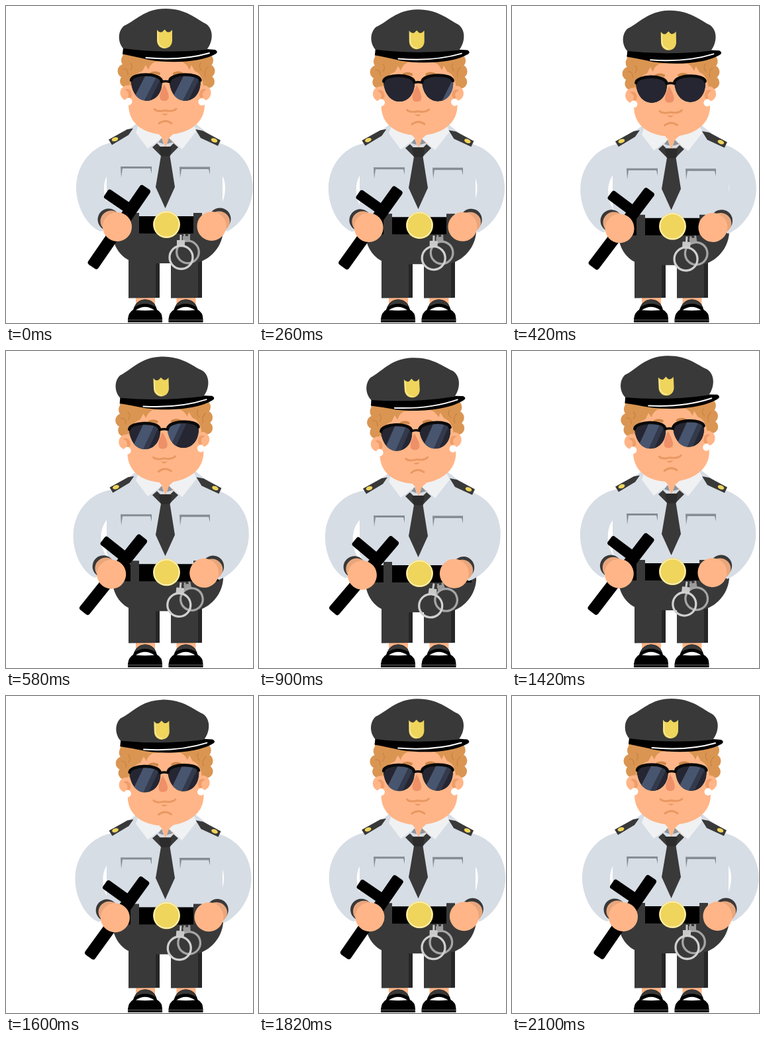
Animation, 373 px wide and 478 px high, one loop 2.12 s. Source, as an HTML page:

```html
<!DOCTYPE html>
<html lang="en">
<head>
<meta charset="utf-8">
<title>Officer</title>
<style>
html, body { margin: 0; width: 100%; height: 100%; overflow: hidden; background: #fff; }
svg { display: block; width: 373px; height: 478px; }
.dark { fill: #393939; }
.shirt { fill: #d7dde5; }
.skin { fill: #ffb587; }
.tan { fill: #e9a67c; }
.hair { fill: #da9552; }
.gold { fill: #efd55b; }
.line { fill: none; stroke-linecap: round; }
</style>
</head>
<body>
<svg viewBox="0 0 373 478">
  <defs>
    <path id="lens" d="M188.500 111C190 101 234 101 236 112C237 131 226 143 212.500 143C198 143 188.500 129 188.500 111Z"/>
    <clipPath id="lensClip"><use href="#lens"/></clipPath>
    <g id="shoe">
      <path class="skin" d="M196 439h29v14h-29z"/>
      <path d="M184 477V472Q185 462 192 458Q197 442.500 210 442.500Q224 442.500 228 458Q236 462 236 472V477Z"/>
      <path class="dark" d="M194 454Q199 442.500 210 442.500Q222 442.500 226 454Q210 444 194 454Z"/>
      <path fill="#fff" d="M196 458.500Q210 449 224 458.500Q210 460 196 458.500Z"/>
      <path fill="#666" d="M184 473h52v1h-52z"/>
    </g>
    <g id="leg">
      <path class="dark" d="M185 345h47v95l-47 .5z"/>
      <path fill="#262626" d="M226 345h6v94l-6 1z"/>
    </g>
    <g id="shine">
      <path fill="#48556f" d="M214 98H232L208 145H190Z"/>
      <path fill="#333a4c" d="M232 98H240L216 145H208Z"/>
    </g>
  </defs>

  <use href="#shoe"/><use href="#shoe" x="61.5"/>
  <use href="#leg"/><use href="#leg" x="64"/>

  <g id="body">
    <path class="dark" d="M159 314H328V340C326 366 304 388 279 388H207C183 388 164 373 160 343Z"/>
    <path class="shirt" d="M199 176L172 196L152 212V300L160 318H327V212L306 193L286 177Z"/>
    <path d="M168 317h153v26h-153z"/>
    <path class="dark" d="M188 312h13v32h-13zM283 312h13v32h-13z"/>
    <circle class="gold" cx="242.500" cy="329.500" r="20.500"/>
    <circle class="line" cx="242.500" cy="329.500" r="19" stroke="#fdf6cf" stroke-width="1.400"/>

    <path fill="#868c93" d="M173 242H220V253L218 245H176L174 259ZM262 242.500H308V254L306 246H265L263 259Z"/>
    <path class="skin" d="M220 180H265V200L241 215Z"/>
    <path fill="#f0f1f3" d="M201 177L196 191L214 215L236 199L228 190ZM283 178L288 188L266 216L246 199L256 190Z"/>
    <path class="shirt" d="M227 208L235 199L241 213ZM246 199L255 208L241 213Z"/>
    <path fill="#8d949b" d="M230 205.500L235 199L238 208ZM246 199L252 205.500L243 208Z"/>
    <path class="dark" d="M221 213L228 207L233 212H248L253 207L260 213L251 222L247.500 226L255 273L240.500 305L226 273L234 226L230 222Z"/>
    <path fill="#2c2c2c" d="M231 214L233 212H248L250 214L247.500 226.500H234Z"/>

    <g id="leftArm">
      <path class="shirt" d="M165 205C130 209 106 239 106 274C106 302 122 332 143 340L180 326C159 314 148 295 148 275C148 265 151 257 156 250L175 216Z"/>
      <ellipse class="dark" cx="155" cy="322" rx="16.500" ry="16.500"/>
      <ellipse class="tan" cx="159" cy="324.500" rx="16.500" ry="16"/>
      <rect x="98.500" y="324" width="145" height="18.500" rx="4" transform="rotate(-55.5 171 333.500)"/>
      <rect x="151" y="275.500" width="46" height="16" rx="3.500" transform="rotate(34 153.500 283)"/>
      <circle class="skin" cx="168" cy="333" r="22"/>
    </g>
    <g id="rightArm">
      <path class="shirt" d="M313 205C349 210 372.500 239 372.500 274C372.500 304 354 330 334 340L299 326C320 315 331 295 331 274C331 263 328 256 322 250L303 216Z"/>
      <ellipse class="dark" cx="323" cy="321" rx="16.500" ry="16.500"/>
      <ellipse class="tan" cx="321.500" cy="325" rx="16.500" ry="15.500"/>
      <circle class="skin" cx="310.500" cy="332" r="22"/>
    </g>

    <g id="marks">
      <path class="dark" d="M155 201.500L183 186L192 184.500L185 194.500L160 209.500ZM286 186L297 188L324 202.500L320 211L294 199Z"/>
      <ellipse class="gold" cx="164.500" cy="201" rx="5" ry="3" transform="rotate(-18 164.500 201)"/>
      <ellipse class="gold" cx="314.500" cy="202.500" rx="5" ry="3" transform="rotate(22 314.500 202.500)"/>
    </g>

    <g id="backCuff">
      <path fill="#9b9b9b" d="M268 344h3v4h-3zM275 344h3v4h-3zM267 347h11v8h-11z"/>
      <circle class="line" cx="274.500" cy="371" r="16.800" stroke="#a5a5a5" stroke-width="3.300"/>
    </g>
    <g id="frontCuff">
      <path fill="#c9c9c9" d="M262.500 345h3v9h-3zM258 353h12v9h-12z"/>
      <circle class="line" cx="264.500" cy="379" r="17.500" stroke="#d0d0d0" stroke-width="3.300"/>
    </g>

    <g id="head">
      <g class="hair">
        <circle cx="185" cy="82" r="11"/><circle cx="179" cy="98" r="10.500"/><circle cx="182" cy="113" r="10"/>
        <circle cx="302" cy="82" r="11"/><circle cx="305" cy="98" r="10.500"/><circle cx="305" cy="114" r="10"/>
      </g>
      <circle class="skin" cx="184" cy="131" r="11.500"/><circle class="skin" cx="298" cy="131" r="11.500"/>
      <path class="skin" d="M188 78H297L300 149C300 180 270 194 242 194C212 194 185 180 185 149Z"/>
      <path fill="#ef9d69" d="M179 126Q189 122 190 134Q190 140 184 138Q188 130 179 126ZM303 126Q293 122 292 134Q292 140 298 138Q294 130 303 126Z"/>
      <circle cx="185" cy="144" r="5.500" fill="#fff"/><circle cx="296" cy="144.500" r="5.500" fill="#fff"/>
      <path class="hair" d="M176 70H310V104L298 121Q297 103 285 98L280 89L277 96Q273 86 263 83L225 84Q217 88 215 96L211 89L206 98Q191 103 189 121L178 104Z"/>
      <path class="line" stroke="#c98344" stroke-width="1.300" d="M177 95Q185 94 184 104M188 86Q193 91 188 97M305 92Q298 97 301 106M294 86Q290 91 295 97"/>
      <path class="line" stroke="#ce8749" stroke-width="4" d="M219 102Q225 99 231 102M254 102Q260 99 266 102"/>
      <path fill="#ee9068" d="M239 118C247 133 249 143 239 143C229 143 231 133 239 118Z"/>
      <path class="line" stroke="#e99862" stroke-width="3" d="M224 155.500Q228 160 240 157.500Q252 160 257 155M231 177Q241 170 250 177"/>
      <path fill="#e99862" d="M235 162Q240 163 245 162Q240 168 235 162Z"/>

      <g clip-path="url(#lensClip)">
        <use href="#lens" fill="#252632"/>
        <use class="glint" href="#shine"/>
      </g>
      <g clip-path="url(#lensClip)" transform="translate(58)">
        <use href="#lens" fill="#252632"/>
        <use class="glint" href="#shine"/>
      </g>
      <g class="line" stroke="#0a0a0a">
        <path stroke-width="4.500" d="M189 112C190 101 232 100 235 113M247 113C249 100 292 101 293.500 112"/>
        <path stroke-width="3.500" d="M235 114.500Q241 112.500 247 114.500"/>
      </g>

      <path d="M177 63Q240 71 303 65L316 66Q321 69 317 72C295 85 250 87 215 81Q192 75.500 176 72.500Z"/>
      <path class="dark" d="M177 64C169 55 168 39 178 30C195 23 209 4 241 4C272 4 288 20 302 27C314 35 313 54 303 66Q240 72 177 64Z"/>
      <path class="line" stroke="#fff" stroke-width="2" d="M211.500 78Q265 83 307 71"/>
      <path class="gold" d="M228 36Q232 41 236 39L239.500 35.500L243 39Q247 41 251 36V52C251 59 246 64 239.500 64C233 64 228 59 228 52Z"/>
      <path class="line" stroke="#f9efb9" stroke-width="1.200" d="M229.500 40V52Q231 61 239.500 62.500"/>
    </g>
  </g>
</svg>
<script>
const LOOP = 2120, PEAK = 900, SETTLE = 1060;
const ease = u => (1 - Math.cos(Math.PI * Math.min(1, Math.max(0, u)))) / 2;
const pose = (id, value) => document.getElementById(id).setAttribute("transform", value);
const glints = document.querySelectorAll(".glint");

// The glint leaves on the right, then returns from the left.
function glintX(t) {
  if (t < 380) return 62 * ease(t / 380);
  return -55 * (1 - ease((t - 380) / 190));
}

function draw(now) {
  const t = now % LOOP;
  const sink = t < PEAK ? ease(t / PEAK) : 1 - ease((t - PEAK) / SETTLE);
  const sway = (1 - Math.cos(2 * Math.PI * t / LOOP)) / 2;
  pose("body", `translate(0 ${6 * sink})`);
  pose("head", `rotate(${-3.5 * sway} 241 195)`);
  pose("leftArm", `translate(0 ${-0.7 * sink}) rotate(${5.9 * sink} 165 215)`);
  pose("rightArm", `translate(0 ${-0.7 * sink}) rotate(${7.7 * sink} 315 215)`);
  pose("marks", `translate(${2 * sink} 0)`);
  pose("frontCuff", `rotate(${9.5 * sway} 267 345)`);
  pose("backCuff", `rotate(${-17 * sink} 273 343)`);
  glints.forEach((g, i) => g.setAttribute("transform", `translate(${glintX(Math.max(0, t - 85 * i))})`));
  requestAnimationFrame(draw);
}
draw(0);
</script>
</body>
</html>
```
